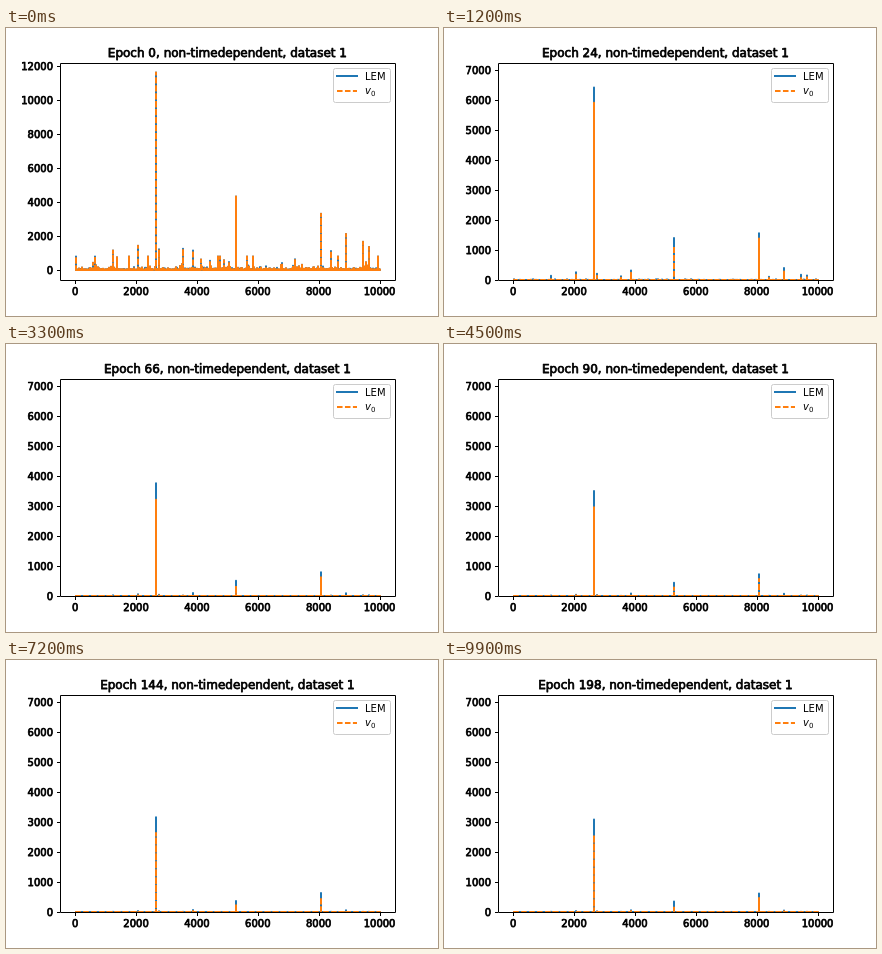
An HTML page with a canvas for the animation above (10 s loop, 432 px wide and 288 px high).

```html
<!DOCTYPE html>
<html lang="en">
<head>
<meta charset="utf-8">
<title>Training epochs</title>
<style>
  html, body { margin: 0; width: 100%; height: 100%; overflow: hidden; background: #fff; }
  canvas { display: block; }
</style>
</head>
<body>
<canvas id="stage" width="432" height="288"></canvas>
<script>
const ctx = document.getElementById('stage').getContext('2d');
const BLUE = '#1f77b4', ORANGE = '#ff7f0e';
const FONT = '"DejaVu Sans", sans-serif';
const DASH = [5.55, 2.4];
const AXES = { left: 54, right: 388.8, top: 34.56, bottom: 252 };
const FRAMES = 100, FRAME_MS = 100, FIXED_FROM = 20;
const TOP_HEIGHT = 11600;

// Tallest spike at a few epochs; every other spike decays as a power of it
const KEYS = [[0, 11600], [14, 7750], [38, 5200], [66, 3760], [112, 3350], [144, 3160], [198, 3080]];

function slope(i) {
  const [[x0, y0], [x1, y1]] = KEYS.slice(i, i + 2);
  return Math.log(y1 / y0) / (x1 - x0);
}

function tangent(i) {
  if (i === 0) return slope(0) * 1.2;
  if (i === KEYS.length - 1) return slope(i - 1) * 0.7;
  const a = slope(i - 1), b = slope(i);
  return 2 * a * b / (a + b);
}

// Monotone cubic through the logarithms of the key heights, 1 at epoch 0
function fade(epoch) {
  let i = 0;
  while (i < KEYS.length - 2 && epoch > KEYS[i + 1][0]) i++;
  const [[x0, y0], [x1, y1]] = KEYS.slice(i, i + 2);
  const w = x1 - x0, t = (epoch - x0) / w, s = 1 - t;
  return Math.exp(Math.log(y0 / TOP_HEIGHT) * (1 + 2 * t) * s * s
    + Math.log(y1 / TOP_HEIGHT) * (3 - 2 * t) * t * t
    + w * t * s * (tangent(i) * s - tangent(i + 1) * t));
}

// Main spikes: position, initial height, decay power
const spikes = [
  [2640, TOP_HEIGHT, 1], [5280, 4320, 1.9], [8070, 3310, 1.27],
  [8890, 2120, 2.8], [9470, 1670, 3.8], [9660, 1350, 3.7],
  [1240, 1150, 3.5], [2060, 1430, 2.9], [2760, 1220, 3],
  [3530, 1250, 3.9], [3870, 1150, 2.2], [8400, 1120, 3.9]
];

// Heavy-tailed background that fades quickly
let seed = 7;
const random = () => (seed = (seed * 16807) % 2147483647) / 2147483647;
const COUNT = 900;
for (let i = 0; i < COUNT; i++) {
  const height = Math.min(800, 28 * Math.pow(random(), -0.6));
  spikes.push([(i + random()) * 10000 / COUNT, height, 6]);
}
spikes.sort((a, b) => a[0] - b[0]);

const lemPower = k => k;
const v0Power = k => k + 0.14 + 0.25 * (k - 1);
const px = x => 69.22 + x * 0.030436;

function stroke(color, width, dash = []) {
  ctx.strokeStyle = color;
  ctx.lineWidth = width;
  ctx.setLineDash(dash);
  ctx.stroke();
}

function line(x1, y1, x2, y2, color = '#000', width = 1, dash) {
  ctx.beginPath();
  ctx.moveTo(x1, y1);
  ctx.lineTo(x2, y2);
  stroke(color, width, dash);
}

function plot(level, power, py, color, dash) {
  const base = Math.round(py(0));
  ctx.beginPath();
  ctx.moveTo(px(0), base);
  for (const [x, height, k] of spikes) {
    const column = Math.round(px(x));
    ctx.lineTo(column, base);
    ctx.lineTo(column, py(height * Math.pow(level, power(k))));
    ctx.lineTo(column, base);
  }
  ctx.lineTo(px(10000), base);
  stroke(color, 2, dash);
}

function text(str, x, y, size, align, heavy, style = '') {
  ctx.font = `${style} ${size}px ${FONT}`;
  ctx.textAlign = align;
  ctx.fillStyle = '#000';
  ctx.fillText(str, x, y);
  if (!heavy) return;
  ctx.strokeStyle = '#000';
  ctx.lineWidth = 0.75;
  ctx.setLineDash([]);
  ctx.strokeText(str, x, y);
}

function legend() {
  ctx.beginPath();
  ctx.roundRect(327.5, 40.5, 57, 34, 2);
  ctx.fillStyle = '#fff';
  ctx.fill();
  stroke('#ccc', 1);
  line(330, 48, 352, 48, BLUE, 2);
  line(331, 63, 351, 63, ORANGE, 2, DASH);
  text('LEM', 359, 52, 10, 'left');
  text('v', 359, 66, 10, 'left', false, 'italic');
  text('0', 365, 68, 7, 'left');
}

function draw(epoch) {
  const { left, right, top, bottom } = AXES;
  const fixed = epoch >= FIXED_FROM;
  const level = fade(epoch), highest = TOP_HEIGHT * level;
  const zero = fixed ? bottom : 242.12;
  const scale = fixed ? 0.03 : 197.68 / highest;
  const py = v => zero - v * scale;

  ctx.fillStyle = '#fff';
  ctx.fillRect(0, 0, 432, 288);
  ctx.lineJoin = 'round';

  ctx.save();
  ctx.beginPath();
  ctx.rect(left, top, right - left, bottom - top);
  ctx.clip();
  plot(level, lemPower, py, BLUE);
  plot(level, v0Power, py, ORANGE, DASH);
  ctx.restore();

  ctx.beginPath();
  ctx.rect(54.5, 35.5, 335, 217);
  stroke('#000', 1);

  for (let v = 0; v <= 10000; v += 2000) {
    const x = Math.round(px(v));
    line(x + 0.5, 253, x + 0.5, 256);
    text(v, px(v), 267, 10, 'center', true);
  }
  const step = fixed || highest * 1.1 / 9 <= 1000 ? 1000 : 2000;
  for (let v = 0; py(v) >= top; v += step) {
    const y = Math.round(py(v));
    line(51, y + 0.5, 54, y + 0.5);
    text(v, 47, y + 4, 10, 'right', true);
  }
  text(`Epoch ${epoch}, non-timedependent, dataset 1`, 221.4, 28.5, 12, 'center', true);
  legend();
}

let shown = -1;
function tick() {
  const frame = Math.floor(performance.now() / FRAME_MS) % FRAMES;
  if (frame !== shown) draw(2 * (shown = frame));
  requestAnimationFrame(tick);
}
tick();
</script>
</body>
</html>
```
